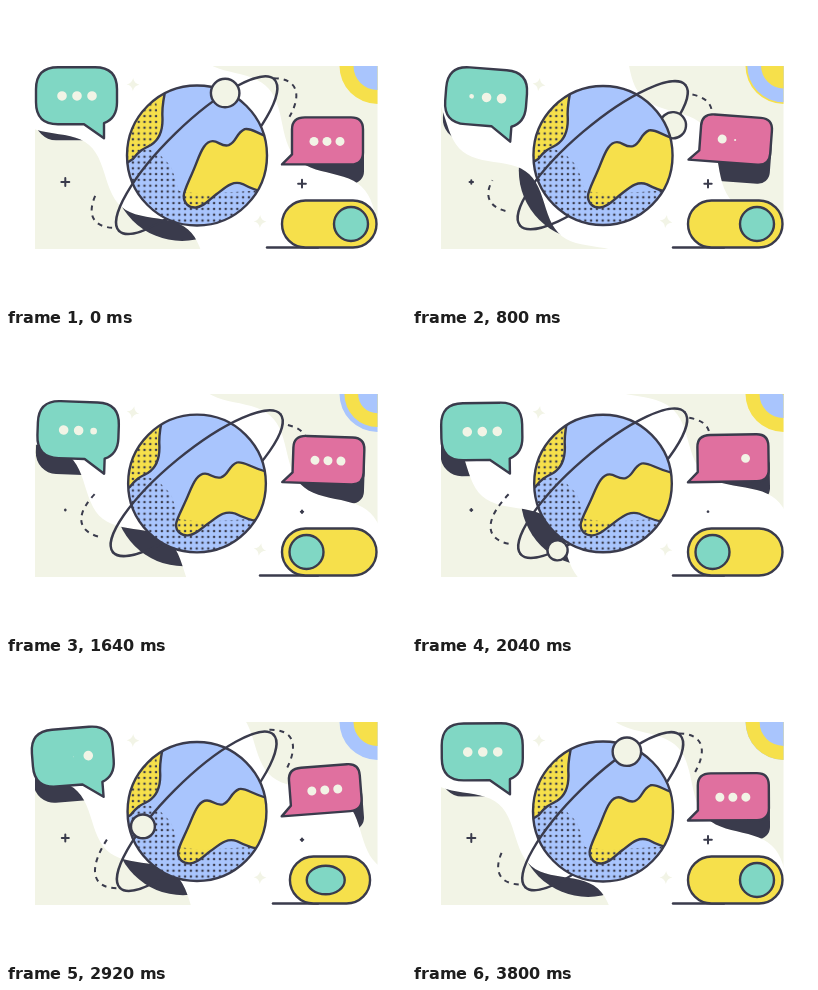
Recreate the animation shown at these times as an HTML page. Size 400x300 px, loop 3840 ms.

```html
<!DOCTYPE html>
<html lang="en">
<head>
<meta charset="utf-8">
<title>Planet chat</title>
<style>
  html, body { margin: 0; width: 100%; height: 100%; overflow: hidden; background: #fff; }
  svg { display: block; width: 400px; height: 300px; }
  .ink { stroke: #3a3b4c; stroke-width: 2.4; stroke-linejoin: round; stroke-linecap: round; }
  .line { fill: none; }
  .dark { fill: #3a3b4c; }
  .cream { fill: #f2f4e6; }
  .blue { fill: #a9c5fd; }
  .yellow { fill: #f6e04b; }
  .teal { fill: #80d7c4; }
  .pink { fill: #e0709f; }
  .thin { stroke-width: 2; }
  .dash { stroke-dasharray: 5 5; stroke-linecap: butt; }
</style>
</head>
<body>
<svg viewBox="0 0 400 300">
  <defs>
    <clipPath id="panel"><rect x="29" y="60" width="342.5" height="183"/></clipPath>
    <clipPath id="fields"><path id="fieldL"/><path id="fieldR"/></clipPath>
    <clipPath id="disc"><circle id="discClip" cx="191" cy="149.5" r="70"/></clipPath>
    <pattern id="dots" x="124" y="113" width="5.8" height="5.8" patternUnits="userSpaceOnUse">
      <circle class="dark" cx="2.9" cy="2.9" r="1.25"/>
    </pattern>
  </defs>

  <g clip-path="url(#panel)">
    <g clip-path="url(#fields)">
      <rect class="cream" x="29" y="60" width="343" height="183"/>
      <circle id="shadeG" class="dark"/>
      <rect id="shadeL" class="dark" x="29" y="77" width="82" height="57" rx="21"/>
      <rect id="shadeR" class="dark" x="286" y="131" width="72" height="47" rx="12"/>
    </g>
    <g id="sun"></g>
  </g>

  <path id="plusL" class="ink line thin"/>
  <path id="plusR" class="ink line thin"/>
  <path id="starA" class="cream" d="M0-6.5Q1-1 6.5 0Q1 1 0 6.5Q-1 1-6.5 0Q-1-1 0-6.5Z"/>
  <path id="starB" class="cream" d="M0-6.5Q1-1 6.5 0Q1 1 0 6.5Q-1 1-6.5 0Q-1-1 0-6.5Z"/>

  <g id="trail">
    <path id="trailL" class="ink line thin dash"/>
    <path id="trailR" class="ink line thin dash"/>
  </g>

  <g class="orbit">
    <path class="ink line" d="M108.500 0A108.500 30.500 0 0 1-108.500 0"/>
    <circle id="moonBack" class="ink cream"/>
  </g>

  <circle id="sea" class="blue" cx="191" cy="149.5" r="70"/>
  <g clip-path="url(#disc)">
    <path id="landL" class="ink yellow" d="M163 70C158 88 156 98 156.500 110C157.500 126 153 134 145 139C137 143 133 145 127 153L100 170V70Z"/>
    <path id="landR" class="ink yellow" d="M178 190C178 184 185 172 191 156C196 143 200 135 207 135C213 135 216 141 223 139C231 136 230 127 239 123C248 121 252 131 285 137V192C258 188 246 183 237 178C227 174 220 181 211 188C203 194 198 201 190 201.500C183 202 178 197 178 190Z"/>
    <path fill="url(#dots)" d="M118 100L150 92L153 126L141 142L155 150L165 160L173 185L195 188L262 184V225H118Z"/>
  </g>
  <circle id="rim" class="ink line" cx="191" cy="149.5" r="70"/>

  <g class="orbit">
    <path id="front" class="ink line" d="M-108.500 0A108.500 30.500 0 0 1 108.500 0"/>
    <circle id="moonFront" class="ink cream"/>
  </g>

  <g id="bubbleL">
    <path class="ink teal" d="M52 61H89Q111 61 111 83V96Q111 112 98 117V132L78 118H52Q30 118 30 96V83Q30 61 52 61Z"/>
  </g>
  <g id="bubbleR">
    <path class="ink pink" d="M299 112H345Q357 112 357 124V147Q357 159 345 159H276L286 149V124Q286 112 299 112Z"/>
  </g>

  <path id="floor" class="ink line"/>
  <rect id="track" class="ink yellow" y="194.500" height="47" rx="23.500"/>
  <ellipse id="knob" class="ink teal" cy="218"/>
</svg>

<script>
const LOOP = 3840;
const TAU = Math.PI * 2;
const $ = id => document.getElementById(id);
const clamp = v => Math.min(1, Math.max(0, v));
const ease = v => (1 - Math.cos(Math.PI * clamp(v))) / 2;
const bump = v => Math.sin(Math.PI * clamp(v));
// One cosine swing per loop, highest at the given time.
const wave = (t, peak) => Math.cos(TAU * (t - peak) / LOOP);

function set(el, attrs) {
  for (const k in attrs) el.setAttribute(k, attrs[k]);
}

function add(parent, tag, attrs) {
  const el = document.createElementNS('http://www.w3.org/2000/svg', tag);
  set(el, attrs);
  parent.appendChild(el);
  return el;
}

// Area beside a slanted line that carries a travelling ripple.
function field(x, y, slant, ripple, corner) {
  const c = Math.cos(slant), n = Math.sin(slant);
  let d = '';
  for (let s = -40; s <= 260; s += 5) {
    const o = ripple(s);
    d += `${d ? 'L' : 'M'}${x + c * s + n * o} ${y + n * s - c * o}`;
  }
  return d + 'L' + corner + 'Z';
}

function drawFields(t) {
  const p = t / LOOP;
  const crestL = 198 - 3 * 130 * p + 14 * wave(t, 2500);
  const crestR = 180 - 2 * 138 * p - 30 * wave(t, 1000);
  const rippleL = s => 13 * Math.cos(TAU * (s - crestL) / 130);
  const rippleR = s => 14 * Math.cos(TAU * (s - crestR) / 138) + 0.09 * s * wave(t, 2600);
  set($('fieldL'), { d: field(29, 110, 0.706, rippleL, '-50 300') });
  set($('fieldR'), { d: field(222, 60, 0.772, rippleR, '450 0') });
}

const rings = [0, 1, 2].map(() => add($('sun'), 'circle', { cx: 371.5, cy: 60 }));

// Rings grow outwards, swapping colours each time one fills the disc.
function drawSun(t) {
  const step = LOOP / 4, flip = Math.floor(t / step) % 2;
  const p = ease((t % step) / step);
  [38, 24 + 14 * p * p, 24 * p].forEach((r, i) =>
    set(rings[i], { r, class: (i + flip) % 2 ? 'blue' : 'yellow' }));
}

function drawPlus(id, x, y, s) {
  const h = 4.2 * s;
  set($(id), { d: `M${x - h} ${y}h${2 * h}M${x} ${y - h}v${2 * h}` });
}

function drawSparks(t) {
  drawPlus('plusL', 59.3, 176, 0.56 + 0.46 * wave(t, -350));
  drawPlus('plusR', 296, 177.7, 0.53 + 0.47 * wave(t, 350));
  const tilt = 6 * (1 - wave(t, -400));
  set($('starA'), { transform: `translate(127 78.5) rotate(${tilt})` });
  set($('starB'), { transform: `translate(254 215.5) rotate(${tilt})` });
}

function arc(from, to) {
  const p = deg => [120 * Math.cos(deg * TAU / 360), 41 * Math.sin(deg * TAU / 360)];
  return `M${p(from)}A120 41 0 0 1 ${p(to)}`;
}

const front = $('front');
const halfLap = front.getTotalLength();

function drawOrbit(t) {
  const turn = `translate(190.7 149.2) rotate(${-42.3 + 3.2 * wave(t, 1360)})`;
  document.querySelectorAll('.orbit').forEach(g => set(g, { transform: turn }));

  // The moon keeps a steady speed along the whole ellipse.
  const s = (halfLap / 2 + 64 + 2 * halfLap * t / LOOP) % (2 * halfLap);
  const behind = s >= halfLap, sign = behind ? -1 : 1;
  const p = front.getPointAtLength(s % halfLap);
  const r = 12.2 + 2.1 * wave(t, 120);
  for (const id of ['moonBack', 'moonFront']) {
    const shown = behind === (id === 'moonBack');
    set($(id), { cx: sign * p.x, cy: sign * p.y, r, visibility: shown ? 'visible' : 'hidden' });
  }

  set($('trail'), { transform: `translate(188 147) rotate(${-29 + 9 * wave(t, 1300)})` });
  set($('trailL'), { d: arc(156, 216 + 13 * wave(t, 2500)) });
  set($('trailR'), { d: arc(-26, 34) });
}

function drawGlobe(t) {
  const r = 69.4 + 0.6 * wave(t, 0), lift = 1 - wave(t, 210), shift = -4.7 * lift;
  for (const id of ['sea', 'rim', 'discClip', 'shadeG']) set($(id), { r });
  set($('shadeG'), { cx: 176 + 0.8 * lift, cy: 165 - lift });
  set($('landL'), { transform: `translate(${0.4 * shift} 0)` });
  set($('landR'), { transform: `translate(${shift} 200) scale(1 ${1 + 0.009 * shift}) translate(0 -200)` });
}

function makeDots(id, cx, cy, gap, r) {
  return [-1, 0, 1].map(k => ({
    r, el: add($(id), 'circle', { class: 'cream', cx: cx + k * gap, cy })
  }));
}
const dotsL = makeDots('bubbleL', 71, 89.7, 15, 4.8);
const dotsR = makeDots('bubbleR', 321, 136, 13, 4.5);

// Dots shrink one after another, then grow back in the same order.
function blink(dots, t, starts) {
  dots.forEach((dot, i) => {
    let s = 1;
    for (const start of starts) {
      const u = t - start - i * 150;
      s -= ease(u / 160) - ease((u - 520) / 160);
    }
    dot.el.setAttribute('r', dot.r * clamp(s));
  });
}

function drawBubbles(t) {
  const swing = wave(t, LOOP / 4);
  const moves = {
    L: `translate(${3.7 * swing} ${4 * (1 - wave(t, 210))}) rotate(${4.6 * swing} 71 89.7)`,
    R: `translate(${2.2 * swing} ${-5.8 * (1 - wave(t, 280))}) rotate(${4.4 * swing} 321 136)`
  };
  for (const side in moves) {
    set($('bubble' + side), { transform: moves[side] });
    set($('shade' + side), { transform: moves[side] });
  }
  blink(dotsL, t, [720, 2640]);
  blink(dotsR, t, [80, 1730]);
}

function drawToggle(t) {
  const off = (t - 895) / 440, on = (t - 2720) / 440;
  const squash = bump(off) + bump(on);
  const left = 276 + 8 * squash, right = 370.5 - 6.5 * squash;
  const floor = 261 + 6 * squash - 7 * bump((t - 1320) / 640);
  set($('track'), { x: left, width: right - left });
  set($('knob'), { cx: 345 - 44.5 * (ease(off) - ease(on)), rx: 17 + 2 * squash, ry: 17 - 2.7 * squash });
  set($('floor'), { d: `M${floor} 241.500H312` });
}

function draw(t) {
  drawFields(t);
  drawSun(t);
  drawSparks(t);
  drawOrbit(t);
  drawGlobe(t);
  drawBubbles(t);
  drawToggle(t);
}

const began = performance.now();
function tick() {
  draw((performance.now() - began) % LOOP);
  requestAnimationFrame(tick);
}
tick();
</script>
</body>
</html>
```
